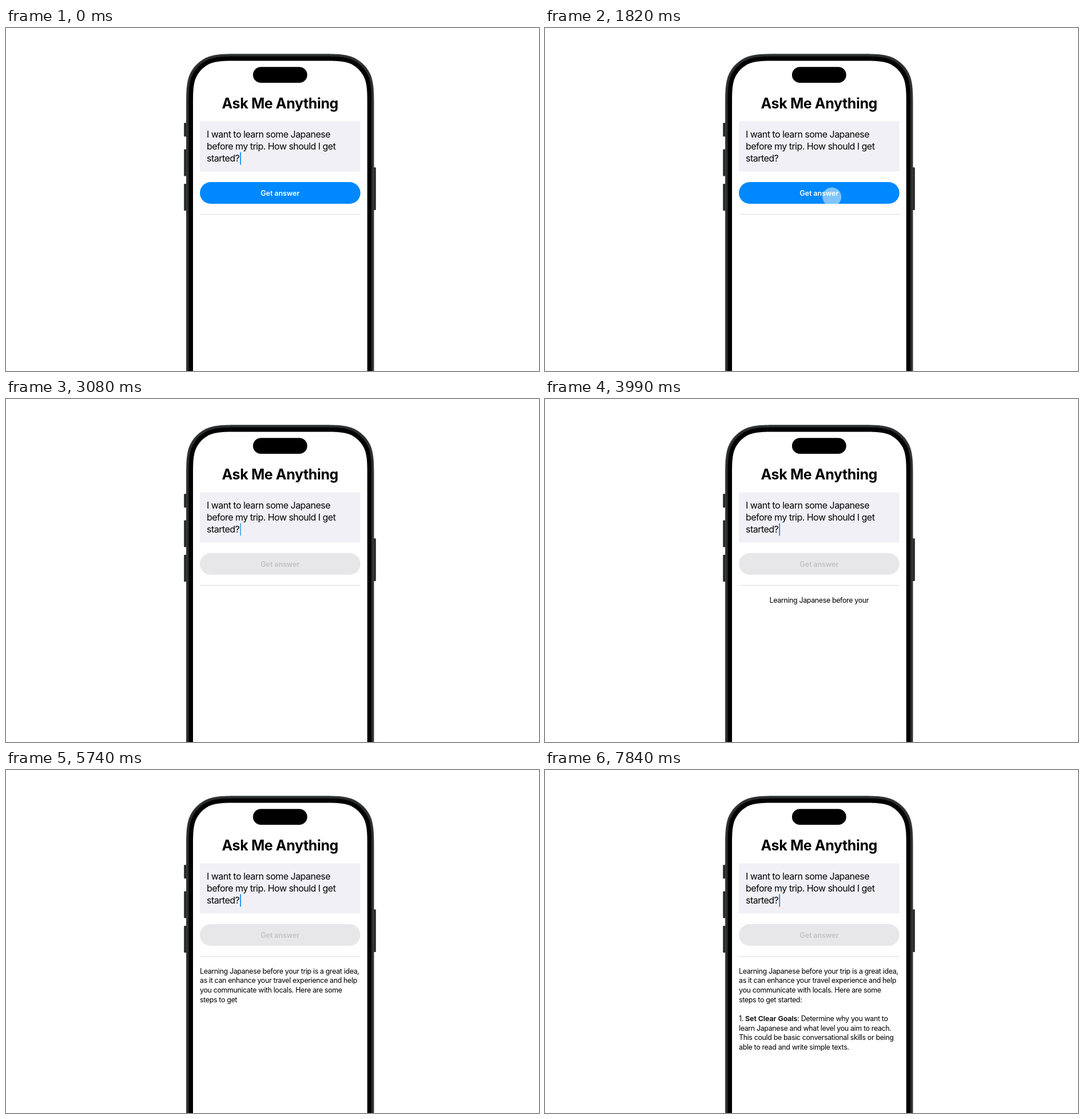
These frames come from a looping animation (932x601 px, 8000 ms). An HTML page with a canvas:

```html
<!DOCTYPE html>
<html lang="en">
<head>
<meta charset="utf-8">
<title>Ask Me Anything</title>
<style>
html, body { margin: 0; width: 100%; height: 100%; overflow: hidden; background: #fff; }
canvas { display: block; width: 932px; height: 601px; }
</style>
</head>
<body>
<canvas id="stage"></canvas>
<script>
const W = 932, H = 601, LOOP = 8000;
const canvas = document.getElementById('stage');
const ctx = canvas.getContext('2d');
const dpr = window.devicePixelRatio || 1;
canvas.width = W * dpr;
canvas.height = H * dpr;

const FAMILY = 'Inter, "Open Sans", sans-serif';
const STYLES = {
  title: { font: `700 25px ${FAMILY}`, spacing: '-0.38px' },
  prompt: { font: `400 16px ${FAMILY}`, spacing: '-0.53px' },
  button: { font: `600 12.5px ${FAMILY}`, spacing: '-0.07px' },
  body: { font: `400 12.4px ${FAMILY}`, spacing: '-0.33px' },
  strong: { font: `600 12.4px ${FAMILY}`, spacing: '-0.05px' }
};

// Streamed answer: [time, added text]
const CHUNKS = [
  [3710, 'Learning'],
  [3990, ' Japanese before your'],
  [4200, ' trip is a great'],
  [4690, ' idea,\nas it can'],
  [4970, ' enhance your travel'],
  [5250, ' experience and help\nyou communicate'],
  [5460, ' with locals. Here are'],
  [5740, ' some\nsteps to get'],
  [6020, ' started:\n\n1.'],
  [6370, ' **Set Clear Goals**'],
  [6650, ': Determine why you want to'],
  [6930, '\nlearn Japanese and what level you aim'],
  [7140, ' to reach.\nThis could be'],
  [7420, ' basic conversational skills or being\nable to read'],
  [7630, ' and write simple'],
  [7840, ' texts.']
];

// Caret fades: [fade-out start, fade-in start]
const BLINKS = [[560, 910], [1610, 1960], [2660, 3010], [4200, 4970], [6020, 6370]];
const FADE = 140;
const PRESS = 1820;
const CENTER = 479.3;
const BLUE = [0, 136, 255], GRAY = [231, 231, 233];
const WHITE = [255, 255, 255], DIM = [194, 194, 197];

const clamp = v => Math.min(1, Math.max(0, v));
const ramp = (t, start, span) => clamp((t - start) / span);
const mix = (a, b, k) => `rgb(${a.map((v, i) => Math.round(clamp((v + (b[i] - v) * k) / 255) * 255))})`;

function spring(t) {
  if (t <= 0) return 0;
  const w = 0.01366, d = 0.0123;
  return 1 - Math.exp(-d * t) * (Math.cos(w * t) + d / w * Math.sin(w * t));
}

function rect(x0, y0, x1, y1, color, r = 0) {
  ctx.fillStyle = color;
  ctx.beginPath();
  ctx.roundRect(x0, y0, x1 - x0, y1 - y0, r);
  ctx.fill();
}

// Half-open body with continuous-curvature top corners
function shell(x0, y0, x1, r, color) {
  ctx.beginPath();
  ctx.moveTo(x0, H + 10);
  for (const left of [true, false]) {
    const p = (u, v) => left ? [x0 + u * r, y0 + v * r] : [x1 - v * r, y0 + u * r];
    ctx.lineTo(...p(0, 1.529));
    ctx.bezierCurveTo(...p(0, 1.088), ...p(0, 0.868), ...p(0.075, 0.631));
    ctx.bezierCurveTo(...p(0.169, 0.373), ...p(0.373, 0.169), ...p(0.631, 0.075));
    ctx.bezierCurveTo(...p(0.868, 0), ...p(1.088, 0), ...p(1.529, 0));
  }
  ctx.lineTo(x1, H + 10);
  ctx.closePath();
  ctx.fillStyle = color;
  ctx.fill();
}

function text(str, x, y, style, color, align = 'left') {
  ctx.font = STYLES[style].font;
  ctx.letterSpacing = STYLES[style].spacing;
  ctx.fillStyle = color;
  ctx.textAlign = align;
  ctx.fillText(str, x, y);
  return ctx.measureText(str).width;
}

function drawPhone() {
  for (const [a, b] of [[166.3, 190.3], [212.5, 259.5], [273, 320]]) rect(311.2, a, 317, b, '#24282a', 1);
  rect(641, 244.3, 646.8, 319, '#24282a', 1);
  shell(315, 45.2, 643.5, 63, '#3c4041');
  shell(316.3, 46.5, 642.2, 62, '#2a2e2f');
  shell(319.5, 49.7, 639, 59, '#000');
  shell(327, 57.4, 631.7, 52, '#fff');
  rect(431.9, 68.2, 526.7, 96.1, '#000', 14);
}

function caretAlpha(t) {
  let a = 1;
  for (const [off, on] of BLINKS) {
    if (t >= off) a = Math.max(1 - ramp(t, off - 35, FADE), ramp(t, on - 35, FADE));
  }
  return a;
}

function drawPrompt(t) {
  text('Ask Me Anything', CENTER, 141, 'title', '#000', 'center');
  rect(339, 163.5, 619.7, 251.5, '#f1f0f7');
  ['I want to learn some Japanese', 'before my trip. How should I get', 'started?']
    .forEach((line, i) => text(line, 351, 191.8 + i * 21.22, 'prompt', '#000'));
  ctx.globalAlpha = caretAlpha(t);
  rect(409.3, 217.5, 411, 239.7, '#0a88f0', 0.8);
  ctx.globalAlpha = 1;
}

function drawButton(t) {
  const k = spring(t - PRESS);
  rect(339, 270, 619.7, 308, mix(BLUE, GRAY, k), 19);
  text('Get answer', CENTER, 293.6, 'button', mix(WHITE, DIM, clamp(k)), 'center');
  const touch = ramp(t, 1540, 210) * (1 - ramp(t, 1820, 210));
  if (touch > 0) {
    ctx.fillStyle = `rgba(255,255,255,${0.5 * touch})`;
    ctx.beginPath();
    ctx.arc(501.7, 296, 16.5, 0, Math.PI * 2);
    ctx.fill();
  }
  rect(339, 326, 619.7, 327, '#dcdcde');
}

function drawAnswer(t) {
  const shown = CHUNKS.filter(c => c[0] <= t).map(c => c[1]).join('');
  if (!shown) return;
  const lines = shown.split('\n');
  if (lines.length === 1) {
    text(shown, CENTER, 356.5, 'body', '#000', 'center');
    return;
  }
  lines.forEach((line, i) => {
    let x = 339;
    line.split('**').forEach((run, j) => {
      x += text(run, x, 356.5 + i * 16.7, j % 2 ? 'strong' : 'body', '#000');
    });
  });
}

function frame() {
  const t = performance.now() % LOOP;
  ctx.setTransform(dpr, 0, 0, dpr, 0, 0);
  ctx.fillStyle = '#fff';
  ctx.fillRect(0, 0, W, H);
  drawPhone();
  drawPrompt(t);
  drawButton(t);
  drawAnswer(t);
  requestAnimationFrame(frame);
}
requestAnimationFrame(frame);
</script>
</body>
</html>
```
